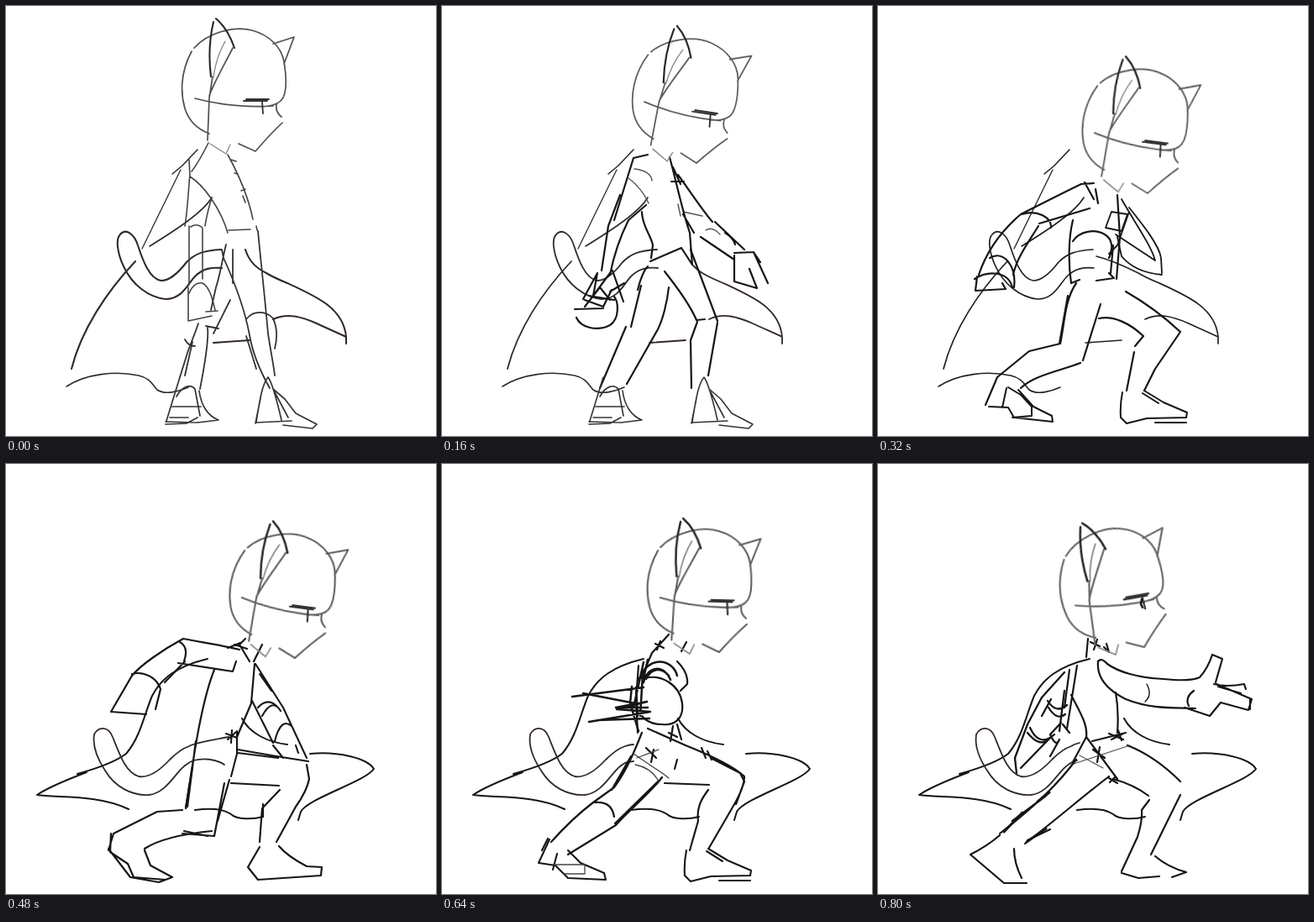
Animation of 512 by 512 pixels, one loop 960 ms. Source, as an HTML page:

```html
<!DOCTYPE html>
<html lang="en">
<head>
<meta charset="utf-8">
<title>Cat-eared fighter sketch</title>
<style>
  html, body { margin: 0; width: 100%; height: 100%; overflow: hidden; background: #fff; }
  svg { display: block; width: 100vw; height: 100vh; }
  path { fill: none; stroke-linecap: round; stroke-linejoin: round; }
  .soft { filter: blur(.6px); }
</style>
</head>
<body>
<svg id="stage" viewBox="0 0 512 512"></svg>
<script>
const STEP = 160;
const stage = document.getElementById('stage');

function node(tag, attrs, parent) {
  const el = document.createElementNS('http://www.w3.org/2000/svg', tag);
  for (const key in attrs) el.setAttribute(key, attrs[key]);
  parent.append(el);
  return el;
}
const ink = (g, d, width = 2.2, stroke = '#161616') =>
  node('path', { d, stroke, 'stroke-width': width }, g);

const head = {
  skull: `M221 54C207 80 208 105 213 122C218 138 229 147 242 152
    M224 50C240 32 272 23 293 29C315 35 328 50 331 66C334 85 335 106 327 113C322 118 314 119 305 120
    M225 110C255 118 285 121 318 119`,
  face: `M322 117C321 124 324 129 328 132M329 139Q315 152 297 173L277 164
    M318 45L343 37L331 69M270 50C260 70 248 90 242 107M246 84L242 110L240 160`,
  faint: 'M261 42C253 56 249 70 247 85M243 164L262 176L267 165',
  ear: 'M247 19C243 36 241 60 244 84M250 15C262 25 268 38 272 50',
  brow: 'M286 111H313M283 113L311 113M305 114L306 128'
};
function drawHead(g, { x = 0, y = 0, turn = 0, color, width, soft }) {
  const h = node('g', {
    transform: `translate(${x} ${y}) rotate(${turn} 297 173)`,
    class: soft ? 'soft' : ''
  }, g);
  ink(h, head.skull + head.face, width, color);
  ink(h, head.faint, width - .4, '#888');
  ink(h, head.ear, width + .4, '#282828');
  ink(h, head.brow, width + .1, '#333');
}

function drawHangingCape(g, width, color, frontStart) {
  ink(g, 'M208 195L162 289', 1.3, color);
  ink(g, 'M198 200L210 190L228 171M171 286C205 265 235 245 245 228', 1.6, color);
  ink(g, `M154 304C120 340 90 385 78 432
    M${frontStart}C310 318 318 323 335 330C370 346 402 360 405 394L405 402
    M318 373C335 365 352 370 370 378C385 385 397 390 405 394M247 401L290 398`, width, color);
  ink(g, `M72 453C95 438 130 434 158 440C172 443 175 452 180 457C190 464 208 458 217 454`, 1.6, color);
  ink(g, `M256 290C235 291 225 295 215 305C205 318 195 327 185 327C170 325 162 300 157 285
    C153 272 143 264 136 272C130 278 133 295 140 310C150 332 170 347 190 349
    C210 349 217 330 225 322C235 312 245 311 257 312`, width, color);
}

function drawSpreadCape(g, dx, tailEnds) {
  const c = node('g', { transform: `translate(${dx} 0)` }, g);
  ink(c, `M240 232C203 241 185 255 174 276C164 300 160 325 143 345C130 355 110 362 85 369
    M96 367C75 375 50 385 37 394C60 398 110 393 146 411
    M362 345C395 342 430 350 438 363C428 378 360 398 351 414L348 424
    M225 412C240 410 258 410 268 417C275 424 295 423 306 420
    M281 303C290 320 310 331 335 334`, 2);
  ink(c, `M${tailEnds[0]}C212 338 203 344 195 352C183 365 170 374 158 372C142 367 135 345 127 325
    C122 312 110 312 105 322C103 335 108 350 118 365C130 385 150 395 170 394
    C190 392 200 370 212 360C217 356 218 355 ${tailEnds[1]}`, 1.8, '#33282b');
}

const leftShoe = `M207 442L191 494M203 465C210 452 220 450 225 456L231 488
  M230 458C232 475 240 488 253 493L228 496L190 495M198 477H232M195 490H217M190 498L215 497L228 490`;
const rightShoe = `M298 495C302 470 305 450 312 442C318 450 325 480 328 493
  M318 456L332 468L345 485L370 498L365 503L330 499M297 496L340 494M320 460L336 490M303 467L297 497`;
const flatShoe = `M291 460Q288 475 289 490L296 497L320 491L367 490L368 484L340 472L317 458
  M315 461L334 473M330 496H367`;

const standing = g => {
  drawHangingCape(g, 2.1, '#33282b', '285 290C290 306 300 313 310 318');
  ink(g, `M241 163C235 175 228 188 221 197M218 183L219 203C235 213 255 240 264 270
    M219 200C217 222 216 245 213 262M245 228C240 245 238 255 237 262
    M264 177C275 197 288 225 294 254M268 183L274 185M272 199L276 200M280 220L285 218M282 226L285 234
    M265 267L291 266M298 262L299 267M220 263Q227 258 234 264
    M218 262V332M234 265V325M218 342C222 332 228 329 234 330C243 335 246 350 249 362
    M217 335V375L245 369M238 364L252 363`, 1.6, '#444');
  ink(g, `M257 290L259 300C275 335 285 365 290 392C293 410 300 430 314 455M270 290V330
    M262 284C258 300 255 320 250 335L244 362M300 268C303 300 308 345 312 390C315 410 319 430 320 440
    M287 372C295 362 310 363 318 372C324 385 322 400 320 408M286 393L298 432
    M267 350L247 390M240 383C242 400 235 435 231 456M229 378C225 390 220 402 217 410
    M213 397Q217 405 225 405M238 381L253 384M217 410L207 442M222 400L213 440`, 1.8, '#333');
  ink(g, leftShoe + rightShoe, 1.7, '#333');
  drawHead(g, { color: '#505050', width: 1.7 });
};

const leaning = g => {
  drawHangingCape(g, 1.8, '#33282b', '299 309C303 313 306 316 310 318');
  ink(g, `M229 194C240 195 250 200 250 208M222 205C232 212 242 225 246 235
    M287 245L310 250M314 267Q322 262 331 272M281 236L284 250`, 1.4, '#555');
  ink(g, `M245 177L228 181L205 255M243 237L222 255C212 275 205 295 200 320M212 225L198 262L190 315
    M238 245C238 262 250 275 251 285L249 300M248 304L285 288L298 308
    M271 180C278 205 285 240 295 270L298 308M275 192L284 212M273 209H288
    M281 201C295 220 310 243 322 257M325 257L360 290M287 248L300 270M308 275L348 302
    M337 270Q347 276 349 284M348 294L371 293L388 330M348 297V328L375 336L366 313M371 293L379 305`);
  ink(g, `M160 371C165 383 185 388 200 380C212 372 210 352 205 346M158 361L192 360
    M168 349L185 318L180 345L200 318M170 358L188 335L200 350M203 315L216 352M200 340L217 330
    M175 345L205 350M170 350L192 358L202 338`);
  ink(g, `M237 333L225 382M245 310C240 315 236 326 233 338M219 382L188 455
    M270 335C268 355 262 375 257 385L220 450M265 316C280 335 295 355 303 374
    M304 376L296 398L297 455M296 290L328 375M328 377L317 440M303 374L313 373`);
  ink(g, rightShoe, 1.6, '#333');
  ink(node('g', { transform: 'translate(-15 0)' }, g), leftShoe, 1.6, '#333');
  drawHead(g, { x: 6, y: 14, turn: 8.5, color: '#606060', width: 1.8 });
};

const crouching = g => {
  drawHangingCape(g, 1.7, '#222', '260 298C280 303 296 311 310 318');
  ink(g, `M257 211L242 212C215 225 190 238 170 248C150 265 130 290 120 320M252 241L192 259
    M171 248C190 242 207 252 206 264M191 262C180 280 165 300 161 320
    M118 322L116 339L152 337L148 330M115 325C130 315 155 315 160 335M133 300C150 290 165 310 162 335
    M259 218L262 235M246 210L257 230M232 255C226 280 227 310 230 330
    M232 280C240 268 258 265 270 272C280 278 280 290 275 300M230 330L240 326M260 327L281 324L275 318
    M280 285L277 318M285 225L288 275L284 325`);
  ink(g, `M290 230C310 265 325 285 330 303M299 240C315 260 335 285 337 300L338 318
    M283 272L330 303M299 245L285 285L275 295M271 264L278 245L297 248L290 268Z
    M285 275L290 298C300 310 315 318 338 320`, 1.8);
  ink(g, `M236 330C222 350 222 380 217 402M226 345L216 402M265 355L244 422M217 402L180 411L142 442L128 475
    M263 372C280 368 300 378 316 393L306 405M305 412L296 458M295 340Q330 360 360 388L330 432L317 458
    M241 425C215 435 185 440 170 455`);
  ink(g, `M132 477L155 478L162 490L208 495L207 488L185 477L167 457M153 455L148 478
    M155 454L170 463L183 477V488L160 490` + flatShoe, 2);
  drawHead(g, { x: 24, y: 50, turn: 7.5, color: '#606060', width: 1.9, soft: true });
};

const squatting = g => {
  drawSpreadCape(g, 0, ['265 325C242 329 225 332 218 336', '223 353C235 350 250 351 260 358']);
  ink(g, `M211 208C230 212 255 215 278 221M205 237L270 247L274 235M211 208C185 222 160 240 150 252L125 295L167 298
    M150 250C165 246 180 255 184 268L178 292M189 260L213 235M207 212Q218 218 212 235
    M285 208L278 215L290 235M305 215L295 235M272 215L287 220M264 219L279 213
    M248 245C238 270 230 310 225 340L214 410M296 238L292 285L275 325M226 330L216 408`);
  ink(g, `M297 238L330 290L358 350M293 282L318 332M302 250L316 270M300 290Q311 278 322 288
    M305 300Q317 278 327 294M320 330C325 310 332 305 340 312M318 335L330 350M345 335L348 344
    M262 321L275 326M269 317L268 332M264 328L274 319
    M276 340L322 348L360 354M276 344L324 350M275 318V345L268 372`, 2.1);
  ink(g, `M268 380L325 383M326 388L305 410L302 450M306 405V420M358 358L361 375Q358 390 345 408L322 450
    M260 380L248 443M266 376L252 425M222 360L214 410M210 412L180 414L128 440L122 460
    M248 443L210 440M245 437C215 440 185 445 165 458M212 437L240 443
    M122 458L148 492L182 498L198 492L185 485L172 478L165 460M125 440L124 462L145 476L152 492L190 495
    M302 456L288 480L300 495L375 490L376 480L358 479Q335 467 325 455`);
  drawHead(g, { x: 47, y: 58, turn: 7.5, color: '#606060', width: 2.1, soft: true });
};

const rising = g => {
  drawSpreadCape(g, 0, ['228 334C224 334 221 335 218 336', '228 354']);
  ink(g, `M270 203L250 225L237 255M254 214L264 219M260 211L256 221M291 212L285 223
    M280 235C290 245 293 253 292 262L284 270M242 255C260 250 283 262 286 285C288 302 278 312 262 310
    C250 310 242 305 238 300M234 240L231 280L233 320`);
  ink(g, `M234 258C245 226 275 232 280 252M240 260C245 238 266 240 272 257M238 264L245 233
    M243 256C250 242 262 242 270 252M155 277L240 266M168 273L230 285
    M175 307L248 295L208 292L244 283L207 290L245 290M185 305L247 303M226 265L224 285L234 318M231 266L233 300
    M240 236L228 290M239 250L236 300`, 2.5);
  ink(g, `M238 320C230 340 220 365 205 385M225 348L202 388M245 315L290 335M275 312L272 330
    M280 310L285 328M270 320L280 325M243 338L255 350M252 340L249 355M309 338L314 350M316 342L321 352
    M262 373C250 390 225 410 207 430L150 465M258 377L206 428M205 385L180 403Q155 422 130 450M182 403Q202 401 205 420
    M290 335C315 345 345 358 360 372Q360 385 347 407L318 457M320 350L355 368L360 378L350 405M265 380L318 382
    M317 388C308 400 303 410 305 425L295 460M280 352L277 363`);
  ink(g, 'M228 345L265 370L270 374M230 358Q250 362 258 378M232 350L258 340', 1.3, '#444');
  ink(g, `M128 447L115 475L135 478L150 493L195 495L193 487L165 475L150 460M126 446L119 460
    M137 464L132 483` + flatShoe, 2.1);
  ink(g, 'M133 477H170V488H145', 1.3, '#444');
  drawHead(g, { x: 33, y: 51, turn: 1.5, color: '#606060', width: 2.1, soft: true });
};

const reaching = g => {
  drawSpreadCape(g, 12, ['228 332C224 333 221 334 218 336', '225 353']);
  ink(g, `M250 208L248 230M253 212L264 217M261 209L257 221M272 214L275 224L269 218
    M237 240L225 315M230 275C240 295 250 310 248 325L232 355M228 245L222 290
    M262 235C260 255 275 270 295 280C325 292 350 290 378 291M262 235Q266 230 273 238
    C285 247 310 255 340 256C360 258 375 258 383 254Q393 243 398 227L410 232L402 260
    M400 262Q415 266 436 262L438 268M403 262L445 280L441 293L408 284L395 300L365 290
    M370 288Q365 278 376 270M405 265L432 273M443 279V292`);
  ink(g, 'M320 262Q327 275 318 283', 1.4);
  ink(g, `M222 248L195 278L178 310L163 350L165 368M202 282Q212 298 225 287M203 290Q213 306 223 298
    M195 300L206 280M181 314Q192 338 210 322M178 320Q194 340 206 325M218 308L205 322Q212 338 216 328
    M220 310L228 320M206 325L170 362M215 330L205 348M222 270L216 318`, 2.3);
  ink(g, `M283 272Q287 295 285 320M275 321L292 328M286 317L290 329M278 328L292 321M255 330L295 320M248 325L285 375
    M256 340L270 350M264 337L261 355M275 374L285 380M283 372L276 379`);
  ink(g, 'M230 358L300 335M240 347L268 362', 1.2, '#555');
  ink(g, `M236 352C215 380 190 405 145 440M200 395L160 425M275 372C245 395 210 425 175 452M205 435L178 448
    M280 375Q305 382 322 395M323 400L314 412Q315 425 309 444L290 485M297 335C320 344 342 360 360 378M360 394L325 465
    M145 442Q130 455 110 465L150 499H177M162 458Q162 475 171 493
    M290 487L310 493L335 491M350 492L367 486Q345 480 330 467`);
  ink(g, 'M177 450L200 434M150 438L172 415M190 402L204 391', 3);
  drawHead(g, { x: 20, y: 45, turn: -10, color: '#686868', width: 2.2, soft: true });
  ink(g, 'M314 161L313 167L315 171', 2.4);
};

const poses = [standing, leaning, crouching, squatting, rising, reaching].map(draw => {
  const g = node('g', { visibility: 'hidden' }, stage);
  draw(g);
  return g;
});

function tick() {
  const now = Math.floor(performance.now() / STEP) % poses.length;
  poses.forEach((g, i) => g.setAttribute('visibility', i === now ? 'visible' : 'hidden'));
  requestAnimationFrame(tick);
}
tick();
</script>
</body>
</html>
```
